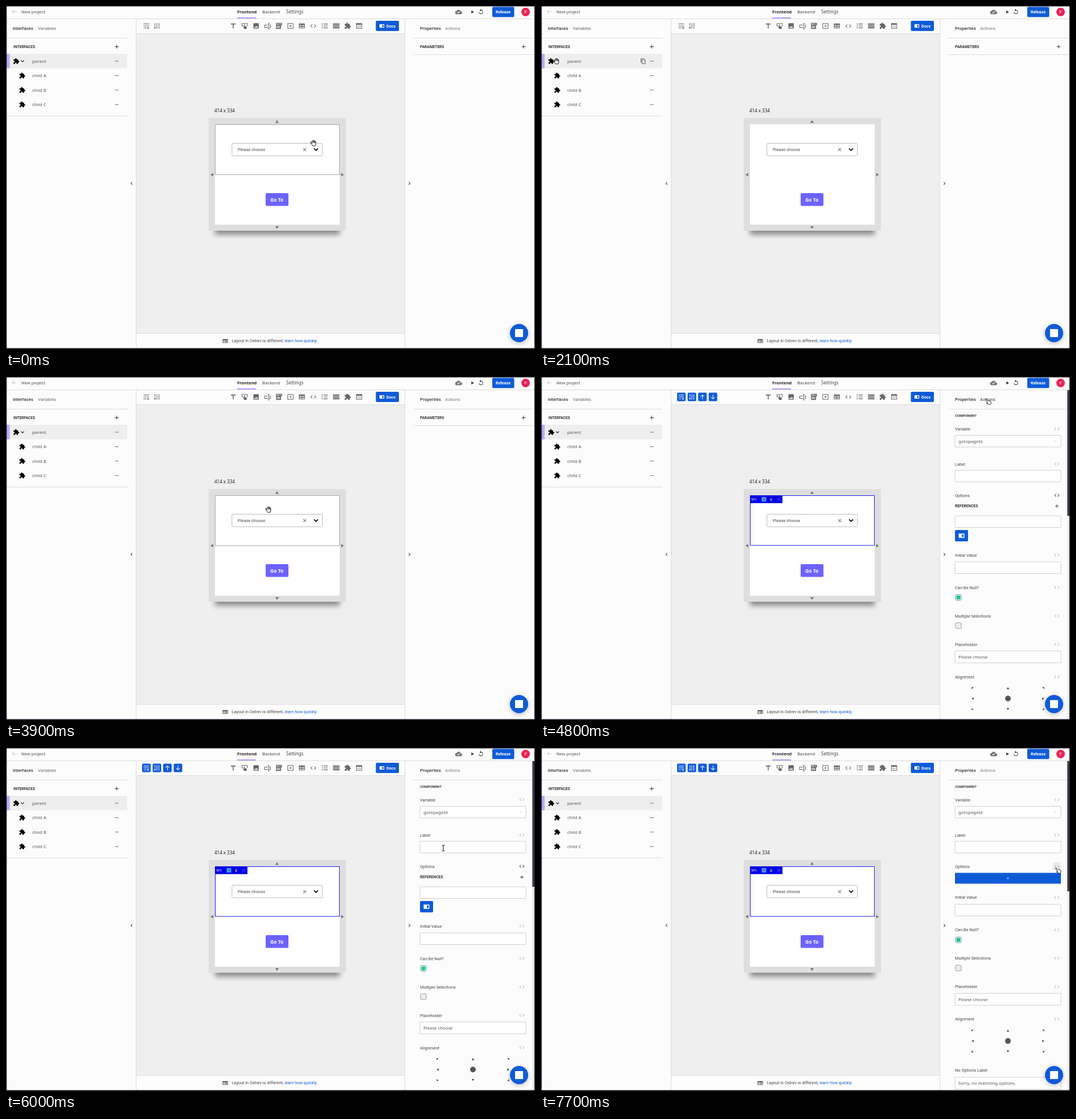
Animation of 929x603 px, one loop 8 s. Source, as an HTML page:

```html
<!DOCTYPE html>
<html lang="en">
<head>
<meta charset="utf-8">
<title>Interface editor</title>
<style>
html, body { margin: 0; width: 100%; height: 100%; overflow: hidden; background: #fcfcfc; }
svg { display: block; width: 929px; height: 603px; }
text { white-space: pre; }
</style>
</head>
<body>
<svg id="stage" viewBox="0 0 929 603"></svg>
<script>
const BLUE = '#0e5bd7', GREY = '#666', LINE = '#dcdcdc';
const ROBOTO = 'Roboto, sans-serif', NOTO = "'Noto Sans', sans-serif";

// Icons on a 24 unit grid
const ICONS = {
  puzzle: 'M20.5 11H19V7c0-1.1-.9-2-2-2h-4V3.5C13 2.1 11.9 1 10.5 1S8 2.1 8 3.5V5H4c-1.1 0-2 .9-2 2v3.8h1.5a2.7 2.7 0 0 1 0 5.4H2V20c0 1.1.9 2 2 2h3.8v-1.5a2.7 2.7 0 0 1 5.4 0V22H17c1.1 0 2-.9 2-2v-4h1.5a2.5 2.5 0 0 0 0-5z',
  type: 'M4 4v3h6.5v13h3V7H20V4z',
  button: 'M2 3h20v10h-3v-2h1V5H4v6h4v2H2zM10 7h3v6l6 2v7h-8l-5-6 1-1 3 1z',
  image: 'M21 19V5c0-1.1-.9-2-2-2H5c-1.1 0-2 .9-2 2v14c0 1.1.9 2 2 2h14c1.1 0 2-.9 2-2zM8.5 13.5l2.5 3 3.5-4.5 4.5 6H5z',
  input: 'M1 8h12v2H3v6h10v2H1zM19 8h4v10h-4v-2h2v-6h-2zM13 3h6v2h-2v16h2v2h-6v-2h2V5h-2z',
  select: 'M2 2h20v8h-3v12H2zM4 12v2h12v-2zM4 16v2h12v-2zM4 5v2h9V5zM15 5l2 3 2-3z',
  video: 'M2 3h20v18H2zM4 5v14h16V5zM10 8l6 4-6 4z',
  table: 'M2 4h20v16H2zM4 9v3h7V9zM13 9v3h7V9zM4 15v3h7v-3zM13 15v3h7v-3z',
  code: 'M9.4 16.6 4.8 12l4.6-4.6L8 6l-6 6 6 6zM14.6 16.6l4.6-4.6-4.6-4.6L16 6l6 6-6 6z',
  list: 'M2 4h3v3H2zM2 10.5h3v3H2zM2 17h3v3H2zM8 4.5h14v2H8zM8 11h14v2H8zM8 17.5h14v2H8z',
  bars: 'M1 4h22v4H1zM1 10h22v4H1zM1 16h22v4H1z',
  widget: 'M2 3h20v18H2zM4 8v11h16V8zM10 10l1 1-2.5 2.5L11 16l-1 1-3.5-3.5zM14 10l3.5 3.5L14 17l-1-1 2.5-2.5L13 11z',
  addRow: 'M2 4h20v2H2zM2 11h20v2H2zM2 18h10v2H2zM17 15h2v3h3v2h-3v3h-2v-3h-3v-2h3z',
  arrow: 'M11 21V7l-5 5-1.5-1.5L12 3l7.5 7.5L18 12l-5-5v14z',
  plus: 'M5 11h6V5h2v6h6v2h-6v6h-2v-6H5z',
  minus: 'M4 11h16v2H4z',
  copy: 'M16 1H4c-1.1 0-2 .9-2 2v14h2V3h12zM19 5H8c-1.1 0-2 .9-2 2v14c0 1.1.9 2 2 2h11c1.1 0 2-.9 2-2V7c0-1.1-.9-2-2-2zM19 21H8V7h11z',
  chevron: 'M7.4 8.6 12 13.2l4.6-4.6L18 10l-6 6-6-6z',
  close: 'M19 6.4 17.6 5 12 10.6 6.4 5 5 6.4l5.6 5.6L5 17.6 6.4 19l5.6-5.6 5.6 5.6 1.4-1.4-5.6-5.6z',
  book: 'M1 4h10l1 1 1-1h10v16H13l-1 1-1-1H1zM13.5 7v10H20V7z',
  cloud: 'M19.4 10A7.5 7.5 0 0 0 5.4 8 6 6 0 0 0 6 20h13a5 5 0 0 0 .4-10z',
  check: 'M10 17l-3.5-3.5 1.4-1.4 2.1 2.1L15.2 9l1.4 1.4z',
  upload: 'M14 13v4h-4v-4H7l5-5 5 5z',
  play: 'M7 4v16l13-8z',
  replay: 'M12 5V1L7 6l5 5V7a6 6 0 1 1-6 6H4a8 8 0 1 0 8-8z',
  layout: 'M1 4h22v16H1zM3 9v4h11V9zM16 9v4h5V9zM3 15v3h11v-3zM16 15v3h5v-3z',
  tri: 'M12 4 22 20H2z',
  corner: 'M4 4h16L4 20z'
};

const icon = (name, x, y, size = 13, fill = GREY, turn = 0) =>
  `<path d="${ICONS[name]}" fill="${fill}" fill-rule="evenodd" transform="translate(${x} ${y}) rotate(${turn}) scale(${size / 24}) translate(-12 -12)"/>`;
const box = (x, y, w, h, fill, r = 0, extra = '') =>
  `<rect x="${x}" y="${y}" width="${w}" height="${h}" rx="${r}" fill="${fill}" ${extra}/>`;
const text = (x, y, s, size = 7.45, fill = '#444', weight = 400, font = ROBOTO) =>
  `<text x="${x}" y="${y + size * .36}" font-family="${font}" font-size="${size}" font-weight="${weight}" fill="${fill}">${s}</text>`;
const group = (id, body) => `<g id="${id}">${body}</g>`;
const hline = (x, y, w) => box(x, y, w, 1, LINE);
const field = (y, h = 20.5, value = '') =>
  box(727, y, 186, h, '#fff', 1, 'stroke="#cfcfcf"') + text(733, y + h / 2, value, 7.75, '#555', 400, NOTO);
const label = (y, s) => text(727, y, s) + icon('code', 906, y, 11, '#bbb');
const heading = (x, y, s, size = 6.6) => text(x, y, s, size, '#333', 700);

function header() {
  return box(0, 0, 929, 22, '#fdfdfd') + icon('arrow', 14.5, 10, 11, '#ccc', -90) +
    text(27, 10, 'New project', 7.9, '#555') +
    text(406, 10.5, 'Frontend', 7.5, '#222', 600, NOTO) + box(406, 20, 33, 2, '#aaa4f6') +
    text(450, 10.5, 'Backend', 7.8, '#444', 400, NOTO) + text(492, 10.5, 'Settings', 8, '#444', 400, NOTO) +
    icon('cloud', 795, 10.5, 12, '#777') +
    group('saved', icon('check', 795, 10.5, 12, '#fff')) + group('saving', icon('upload', 795, 10.5, 12, '#fff')) +
    icon('play', 819, 10.5, 8.5, '#333') + icon('replay', 834, 10, 11, '#333') +
    box(854, 1.5, 38.5, 18, BLUE, 2) + text(860, 10.5, 'Release', 7.3, '#fff', 700) +
    '<circle cx="912.5" cy="10.5" r="7.5" fill="#ee2455"/>' + text(910.4, 10.5, 'F', 8, '#fff') +
    hline(0, 22, 929);
}

const ROWS = ['parent', 'child A', 'child B', 'child C'];
const rowY = i => 97 + i * 25.4;

function sidebar() {
  const row = (name, i) => text(46, rowY(i), name, 7.9, '#555', 400, NOTO) +
    icon('puzzle', i ? 28.5 : 18, rowY(i), 11.5, '#000') + icon('minus', 194.5, rowY(i), 9.5, '#444');
  return text(12, 39, 'Interfaces', 7.9, '#333', 500) + text(56, 39, 'Variables', 7.7, GREY) +
    hline(1, 56, 212) + heading(13, 71.5, 'INTERFACES') + icon('plus', 194.5, 71.5, 11.5, '#333') +
    box(1, 84, 212, 25.5, '#eee') + box(1, 84, 5.5, 25.5, '#b5aff4') +
    row(ROWS[0], 0) + icon('chevron', 29, 97, 12, '#111') +
    group('children', ROWS.map((n, i) => i ? row(n, i) : '').join('')) +
    group('rowsEnd', hline(1, 193, 212)) + group('copy', icon('copy', 179.5, 0, 10.5, '#444'));
}

function workspace() {
  const tools = ['type', 'button', 'image', 'input', 'select', 'video', 'table', 'code', 'list', 'bars', 'puzzle', 'widget'];
  const layoutTools = [['addRow', 0], ['addRow', 90], ['arrow', 0], ['arrow', 180]];
  const handles = [[476, 203, 0], [591, 296.5, 90], [476, 389.5, 180], [361.5, 296.5, 270]];
  return box(228, 23, 473, 579, '#efefef') + box(228, 23, 473, 25, '#fcfcfc') + hline(228, 48, 473) +
    tools.map((n, i) => icon(n, 399 + i * 20.1, 35, 12.5)).join('') +
    group('plainTools', layoutTools.slice(0, 2).map(([n, a], i) => icon(n, 246.5 + i * 18.6, 35, 12, GREY, a)).join('')) +
    group('activeTools', layoutTools.map(([n, a], i) =>
      box(239 + i * 18.5, 27.5, 15, 15, BLUE, 2) + icon(n, 246.5 + i * 18.5, 35, 11.5, '#fff', a)).join('')) +
    box(649.5, 26, 40.5, 18, BLUE, 2) + icon('book', 660, 35, 9, '#fff') + text(668, 35, 'Docs', 7.2, '#fff', 700) +
    text(366, 184, '414 x 334', 8, '#222', 400, NOTO) +
    box(367, 375, 219, 27, '#000', 0, 'opacity=".42" filter="url(#soft)"') +
    box(356, 197, 241, 198, '#dedede') + box(367, 208, 219, 176.5, '#fff') +
    handles.map(([x, y, a]) => icon('tri', x, y, 7.5, '#7a7a7a', a)).join('') +
    box(396.8, 241.3, 158.8, 22, '#fff', 2, 'stroke="#b8b8b8"') + text(407, 252.3, 'Please choose', 7.4) +
    icon('close', 524.5, 252.3, 10, '#555') +
    '<path d="M541 250.3l3.5 3.5 3.5-3.5" fill="none" stroke="#111" stroke-width="1.9"/>' +
    box(456, 329, 40, 22.5, '#6c63ff', 2) + text(464, 340.5, 'Go To', 8.5, '#fff', 700, NOTO) +
    group('hoverFrame', box(367.5, 208.5, 218, 88, 'none', 0, 'stroke="#aaa"')) +
    group('picked', box(367.5, 208.5, 218, 87.5, 'none', 0, 'stroke="#1a1aee"') +
      box(367, 208, 57, 13.7, '#0000e6') + text(369, 215, '50%', 5.5, '#fff') +
      box(387, 210.5, 9, 9, '#1565e8') + box(389, 212.7, 5, 4.5, 'none', .5, 'stroke="#cde" stroke-width=".8"') +
      box(402.3, 214.5, 3.6, 3, '#7d8f86') + box(403, 212.7, 2.2, 3, 'none', 1, 'stroke="#7d8f86" stroke-width=".7"') +
      icon('list', 417.3, 215, 6, '#7a8cf4')) +
    box(228, 575, 473, 27, '#fcfcfc') + hline(228, 575, 473) + icon('layout', 385, 589, 10, '#444') +
    text(396.5, 588.7, `Layout in Ostrev is different, <tspan fill="${BLUE}">learn how quickly.</tspan>`, 7.35) +
    box(228, 23, 1, 579, LINE) + box(700, 23, 1, 579, LINE) +
    icon('chevron', 220.5, 312, 11, '#333', 90) + icon('chevron', 708.5, 312, 11, '#333', -90);
}

function alignment() {
  const marks = [['corner', 0], ['tri', 0], ['corner', 90], ['tri', 270], null, ['tri', 90], ['corner', 270], ['tri', 180], ['corner', 180]];
  return marks.map((m, i) => {
    const x = 758 + i % 3 * 62, y = 547 + Math.floor(i / 3) * 18.3;
    return m ? icon(m[0], x, y, 5, '#333', m[1]) : `<circle cx="${x}" cy="${y}" r="5" fill="#555"/>`;
  }).join('');
}

function properties() {
  return text(727, 39, 'Properties', 7.9, '#333', 500) + group('actions', text(771, 39, 'Actions', 7.9, 'currentColor')) +
    hline(716, 56, 212) +
    group('params', heading(727, 71.5, 'PARAMETERS') + icon('plus', 909, 71.5, 11.5, '#333') + hline(716, 85, 212)) +
    group('component', heading(727, 67.5, 'COMPONENT', 6.2) +
      label(91, 'Variable') + field(102.5, 20.5, 'gotopageId') + icon('chevron', 903.5, 113, 7, '#bbb') +
      label(153, 'Label') + field(164) + text(727, 208, 'Options') +
      group('codeHover', box(899, 201, 14, 13.5, '#ebebeb', 2)) +
      group('refs', icon('code', 906, 208, 11, '#444') + heading(727, 227, 'REFERENCES', 6.7) +
        icon('plus', 906, 227, 10.5, '#333') + field(244) +
        box(727, 269, 23, 20, BLUE, 2) + icon('book', 738.5, 279, 11, '#fff')) +
      group('adder', icon('code', 906, 208, 11, '#bbb') + box(727, 219.5, 186, 19, BLUE, 1) + icon('plus', 820, 229, 7, '#fff')) +
      group('lower', label(313, 'Initial Value') + field(325) + label(370, 'Can Be Null?') +
        box(728, 382.5, 10, 10, '#e3f5f0', 1.5, 'stroke="#68a898"') + box(729.8, 384.3, 6.4, 6.4, '#18bf98') +
        label(420, 'Multiple Selections') + box(728, 432, 10, 10, '#eee', 1.5, 'stroke="#999"') +
        label(470, 'Placeholder') + field(481.5, 21, 'Please choose') + label(527, 'Alignment') + alignment() +
        label(617, 'No Options Label') + field(629, 21, 'Sorry, no matching options.')) +
      box(924, 23, 4.5, 579, '#ececec') + '<rect id="thumb" x="924.3" y="23" width="4" fill="#3a3b42"/>');
}

const edge = '#171726';
const cursors =
  group('hand', '<path d="M7 13 4 9c-2-2-4 0-2 2l5 7 2 4h9l2-6V8c0-2-3-2-3 0V5c0-2-3-2-3 0V4c0-2-3-2-3 0v1c0-2-4-2-4 0zM11 5v6M14 5v6M17 8v4" transform="scale(.5) translate(-12 -12)" fill="#fff" stroke="#000" stroke-width="1.8" stroke-linejoin="round"/>') +
  group('arrow', '<path d="M0 0v8.6l2-1.8 1.5 3.3 1.5-.7-1.5-3.2h2.6z" fill="#000" stroke="#fff" stroke-width=".5"/>') +
  group('beam', '<path d="M-2.5-5h2l.5.6.5-.6h2M0-4.5v9M-2.5 5h2l.5-.6.5.6h2" fill="none" stroke="#000"/>') +
  group('point', '<path d="M-.4.6C-.6-.2.4-.6 1 0L4.2 3 5.6 2.4 7 3l1.2.4 1 2.2-.4 2L7.5 9.4 4.5 8.8 1.6 7.2l.2-.9 1.7.1z" fill="#fff" stroke="#000" stroke-width=".9" stroke-linejoin="round"/>');

document.getElementById('stage').innerHTML =
  '<defs><filter id="soft" x="-20%" y="-100%" width="140%" height="300%"><feGaussianBlur stdDeviation="5"/></filter></defs>' +
  box(0, 0, 929, 603, '#fcfcfc') + sidebar() + workspace() + properties() + header() +
  '<circle cx="901" cy="577" r="16" fill="#000" opacity=".25" filter="url(#soft)"/>' +
  `<circle cx="901" cy="575" r="16" fill="${BLUE}"/>` + box(894, 568, 14, 14, '#fff') +
  box(0, 0, 1.3, 603, edge) + box(927.9, 0, 1.1, 603, edge) + box(0, 0, 929, .7, edge) + box(0, 601.5, 929, 1.5, edge) +
  group('cursor', cursors);

// Pointer path: time, x, y
const PATH = [
  [0, 540, 241], [100, 540, 241], [600, 39, 92], [700, 39, 92], [800, 6, 82], [1300, 27, 97], [2200, 27, 97],
  [2500, 55, 148], [2800, 55, 148], [2900, 150, 128], [3200, 427, 228], [3300, 427, 228], [3400, 434, 228],
  [3800, 434, 228], [3900, 461, 233], [4100, 461, 233], [4200, 480, 232], [4300, 480, 232], [4500, 762, 107],
  [4600, 762, 107], [4800, 781, 39], [4900, 781, 39], [5100, 779, 40], [5400, 779, 40], [5500, 775, 58],
  [5600, 775, 58], [5800, 772, 116], [5900, 772, 116], [6000, 768, 176], [6100, 768, 176], [6300, 773, 212],
  [6400, 773, 212], [6600, 849, 212], [6700, 849, 212], [6900, 898, 211], [7000, 898, 211], [7200, 904, 211], [8000, 904, 211]
];

function pointerAt(t) {
  const i = PATH.findIndex(k => k[0] > t);
  const [t0, x0, y0] = PATH[i - 1], [t1, x1, y1] = PATH[i], p = (t - t0) / (t1 - t0);
  return [x0 + (x1 - x0) * p, y0 + (y1 - y0) * p];
}

const $ = id => document.getElementById(id);
const show = (id, on) => { $(id).style.display = on ? '' : 'none'; };

function draw(t) {
  const [x, y] = pointerAt(t);
  const within = (l, top, r, b) => x >= l && x <= r && y >= top && y <= b;
  const picked = t >= 4100, adding = t >= 7500, folded = t >= 1600 && t < 2100;
  const onRow = within(1, 84.5, 213, 185.5), onPart = within(367, 208, 586, 296);
  const onTab = within(768, 33, 802, 46), onCode = within(899, 201, 913, 214.5);
  const onField = within(727, 102, 913, 123) || within(727, 164, 913, 184);
  const kind = onRow || onPart ? 'hand' : picked && onField ? 'beam' : onTab || onCode ? 'point' : 'arrow';

  for (const k of ['hand', 'arrow', 'beam', 'point']) show(k, k === kind);
  $('cursor').setAttribute('transform', `translate(${x} ${y})`);
  show('copy', onRow);
  if (onRow) $('copy').setAttribute('transform', `translate(0 ${rowY(Math.floor((y - 84.5) / 25.4))})`);
  show('children', !folded);
  $('rowsEnd').setAttribute('transform', `translate(0 ${folded ? -76 : 0})`);
  show('hoverFrame', onPart && !picked);
  for (const id of ['picked', 'activeTools', 'component']) show(id, picked);
  for (const id of ['plainTools', 'params']) show(id, !picked);
  show('codeHover', onCode);
  show('refs', !adding);
  show('adder', adding);
  $('lower').setAttribute('transform', `translate(0 ${adding ? -50.2 : 0})`);
  $('thumb').setAttribute('height', adding ? 229 : 221);
  $('actions').style.color = onTab ? '#333' : '#777';
  const saving = adding && t < 7700;
  show('saving', saving);
  show('saved', !saving);
}

const start = performance.now();
function tick() {
  const t = (performance.now() - start) % 8000;
  draw(Math.floor(t / 100) * 100);
  requestAnimationFrame(tick);
}
tick();
</script>
</body>
</html>
```
